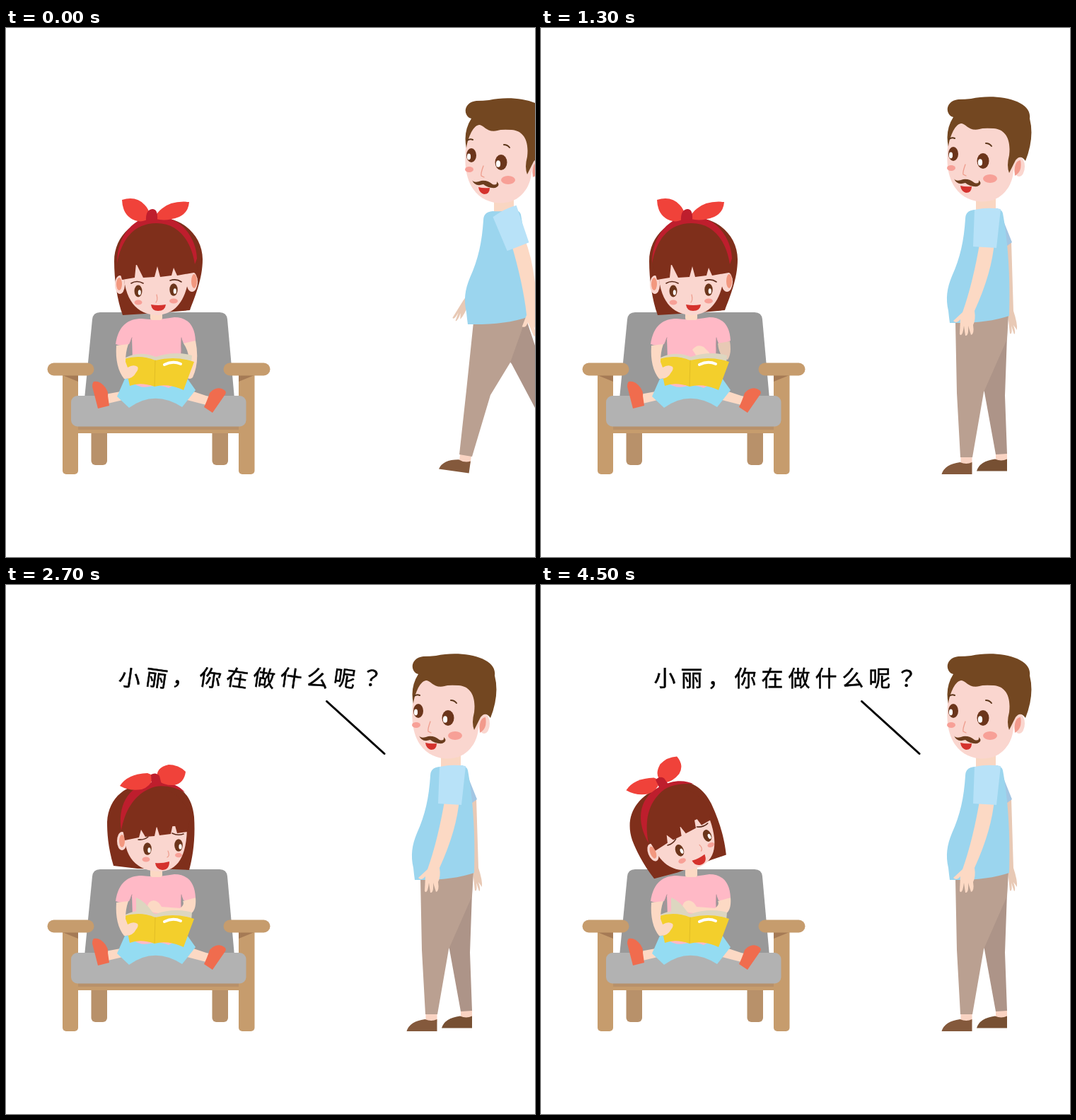
An HTML page that plays this animation: 748 by 748 pixels, repeating every 4700 ms.

```html
<!DOCTYPE html>
<html lang="zh">
<head>
<meta charset="utf-8">
<style>
  html, body { margin: 0; width: 100%; height: 100%; overflow: hidden; background: #fff; }
  svg { display: block; width: 100%; height: 100%; }
  text {
    font: 500 31px "Noto Sans CJK JP", "Noto Sans CJK SC", sans-serif;
    text-anchor: middle; stroke: #000; stroke-width: .5;
  }
</style>
</head>
<body>
<svg id="stage" viewBox="0 0 748 748"></svg>
<script>
const LOOP = 4700, FIRST = 500, STEP = 200;
const SKIN = '#fad6cf', LIMB = '#fcd9c4', SHADE = '#e8c9b5', WOOD = '#c69c6d',
  RED = '#f0423a', BAND = '#be1e2d', HAIR = '#7f2f1b', BROWN = '#734721',
  BLUSH = '#f7a097', PINK = '#ffb9c6', CREAM = '#ddd6c0', LIP = '#d5322d';

const shape = (d, fill) => `<path d="${d}" fill="${fill}"/>`;
const line = (d, color, w) =>
  `<path d="${d}" fill="none" stroke="${color}" stroke-width="${w}" stroke-linecap="round"/>`;
const oval = (x, y, rx, ry, fill) =>
  `<ellipse cx="${x}" cy="${y}" rx="${rx}" ry="${ry}" fill="${fill}"/>`;
const box = (x, y, w, h, r, fill) =>
  `<rect x="${x}" y="${y}" width="${w}" height="${h}" rx="${r}" fill="${fill}"/>`;
const turn = (a, x, y, body) => `<g transform="rotate(${a} ${x} ${y})">${body}</g>`;
const move = (x, y, body) => `<g transform="translate(${x} ${y})">${body}</g>`;
const eye = (x, y, rx, ry, dx) =>
  oval(x, y, rx, ry, '#6b351b') + oval(x + dx, y + 2, rx * .37, ry * .44, '#fff');

// Chair
const chair =
  box(120.5, 560, 22.5, 58, 6, '#b8916a') + box(291.5, 560, 22.5, 58, 6, '#b8916a') +
  shape('M111 524L122 412Q123 402 133 402H302Q312 402 313 412L323 524Z', '#999') +
  box(100, 563, 231, 10, 0, WOOD) + box(100, 563, 231, 5, 0, '#b8916a') +
  box(80, 482, 22, 149, 5, WOOD) + box(329, 482, 22.5, 149, 5, WOOD) +
  shape('M80 491H102V500Z', '#a57a55') + shape('M351 491H329V500Z', '#a57a55') +
  box(92, 520, 247.5, 43.5, 9, '#b2b2b2') +
  box(58.5, 473.5, 66, 18, 9, WOOD) + box(307.5, 473.5, 66, 18, 9, WOOD);

// Girl
const girlBase =
  shape('M162 514L140 518L144 531L165 526Z', LIMB) +
  shape('M262 513L289 522L283 533L256 526Z', LIMB) +
  shape('M124 500Q133 498 141 509Q145 515 144 520L146 534L130 538L122 507Q122 502 124 500Z', '#f06c4e') +
  shape('M288 516Q296 507 305 510Q313 513 310 518L292 544L280 536Q284 528 288 516Z', '#f06c4e') +
  shape('M168 496L157 521L174 537Q210 511 249 536L268 512L256 495Z', '#94dcf2');

const shirt =
  shape('M192 411C173 411 159 420 155 447Q164 451 174 447L178 438L180 502Q190 510 203 507Q217 503 230 509L246 500L248 438L251 446Q260 447 268 442C267 422 258 409 238 409Q212 414 192 411Z', PINK) +
  line('M178 438Q175 444 175 460M248 438Q247 450 249 460', '#b5909a', 1);

const book =
  shape('M169 466Q190 456 212 465Q238 456 263 463L262 474H169Z', CREAM) +
  shape('M167 468Q190 461 211 470Q240 463 266 472L251 512Q230 502 210 507Q190 500 175 506Z', '#f3cf2c') +
  line('M211 470L210 506', '#e2bd25', 1) +
  line('M224 476Q236 470 247 475', '#fff', 4);

const girlArms = {
  hold: shape('M251 446L268 442Q274 472 264 494Q260 498 255 494Q264 465 251 446Z', LIMB),
  rest: shape('M250 446L267 443Q270 460 264 469Q252 466 250 446Z', SHADE) +
    shape('M214 455Q221 446 230 451L238 459V467H222Z', LIMB),
  reach: shape('M250 447L268 442Q270 464 256 467Q235 468 216 464Q202 463 200 456Q200 447 209 446Q216 447 220 455L246 457Q253 452 250 447Z', LIMB)
};

const leftArm = shape('M156 449L173 447Q169 458 169 472L172 480Q180 475 186 479Q188 482 184 487Q179 497 167 496Q154 480 156 449Z', LIMB);
const neck = box(204, 398, 17, 15, 3, LIMB);

function frontHead(closed) {
  const eyes = closed
    ? line('M181 371Q187 369 194 371M183 374H191M231 370Q237 368 243 370M232 373H241', '#6b351b', 1)
    : eye(187, 372, 5.5, 8.5, 1.8) + eye(237, 370, 5.7, 8.8, 1.8);
  const mouth = closed
    ? shape('M210 393Q216 394 222 393Q220 399 216 398Q211 398 210 393Z', LIP)
    : shape('M205 391Q215 393 226 391Q225 400 215 400Q206 400 205 391Z', LIP);
  return shape('M153 330C153 292 184 268 216 268C252 268 278 296 278 327C278 355 267 380 260 399L228 402L165 406C157 385 153 355 153 330Z', HAIR) +
    neck +
    oval(161, 363, 7, 13, SKIN) + oval(160, 362, 4, 9, '#f2987f') +
    oval(263, 359, 8, 14, SKIN) + oval(266, 358, 4, 10, '#f2987f') +
    shape('M166 335C165 385 185 405 213 406C240 405 258 385 260 335Z', SKIN) +
    eyes + mouth +
    line('M177 361Q185 356 194 361M232 357Q241 354 248 359', '#5a2a1a', 1.6) +
    line('M213 377Q215 385 212 388', '#ee9c8c', 1.2) +
    oval(187, 388, 5.5, 3.5, BLUSH) + oval(237, 386, 6, 3.5, BLUSH) +
    shape('M157 330L164 356L182 353L184 333L194 353L210 352L214 337L218 352L234 350L237 339L242 350L271 345C272 300 245 274 213 274C180 274 158 300 157 330Z', HAIR) +
    shape('M157 333C157 292 182 266 212 266C248 266 269 297 270 326L267 334C262 300 243 276 213 276C180 276 163 300 157 333Z', BAND) +
    shape('M164 243Q184 237 196 250Q203 257 204 268Q195 275 186 273Q165 268 164 243Z', RED) +
    shape('M213 263Q228 243 259 246Q258 261 245 267Q227 274 212 270Z', RED) +
    shape('M198 273Q197 257 207 256Q215 256 214 271Q205 269 198 273Z', BAND);
}

// p runs from 0 (upright) to 1 (fully tilted)
function turnedHead(p) {
  const head =
    shape('M152 397C144 370 143 350 143 335C145 300 170 280 207 280C236 278 262 288 266 328C268 360 264 385 259 403L238 402L186 401Z', HAIR) +
    oval(164, 362, 7, 13, SKIN) + oval(164, 362, 4, 9, '#f2987f') +
    shape('M168 345C165 385 185 405 218 405C242 404 256 385 256 340Z', SKIN) +
    eye(200, 373, 5.8, 8.7, 2.5) + eye(244, 368, 5.8, 8.7, 2.5) +
    line('M187 360Q195 361 201 356M235 351Q243 355 251 352', '#5a2a1a', 1.6) +
    line('M229 376Q232 383 228 385', '#ee9c8c', 1.2) +
    oval(198, 388, 5.5, 3.5, BLUSH) + oval(244, 382, 5, 3.3, BLUSH) +
    shape('M211 393Q220 394 231 391Q231 403 221 403Q212 402 211 393Z', LIP) +
    shape('M164 340L168 361L188 357L191 346L197 356L210 355L213 341L217 354L233 352L237 333L242 351L256 349L262 325Q240 285 207 284Q170 290 164 340Z', HAIR) +
    shape('M163 347C158 315 170 284 206 279C228 276 244 283 253 293C236 284 215 281 203 288C180 298 168 320 163 347Z', BAND) +
    turn(22 * p, 207, 275, shape('M161 284Q172 267 200 266Q207 268 208 273Q204 285 192 289Q175 292 161 284Z', RED)) +
    turn(-26 * p, 215, 275, shape('M214 274Q211 258 230 254Q244 254 254 264Q252 280 238 283Q224 284 214 276Z', RED)) +
    shape('M205 268Q212 264 217 270L220 282Q210 283 206 282Z', BAND);
  return neck + move(5 * p, -4 * p, turn(-21.5 * p, 212, 400, head));
}

function girl(k) {
  const late = k >= 12, closed = [3, 4, 6, 10].includes(k);
  const arm = late ? 'reach' : [0, 1, 7, 8].includes(k) ? 'hold' : 'rest';
  const page = late ? 'M184 466V442Q196 446 209 465Z'
    : [3, 4, 10, 11].includes(k) ? 'M210 466Q205 450 212 441Q213 452 220 461Z' : '';
  const head = late ? turnedHead(Math.min(1, (k - 12) / 2)) : frontHead(closed);
  return girlBase + shirt + head + girlArms[arm] + shape(page, CREAM) + book + leftArm;
}

// Man
const manHead =
  shape('M577 150C573 180 572 205 585 225C600 247 625 248 640 243C660 235 668 215 668 200V140L590 130Z', SKIN) +
  oval(676, 196, 8, 14, SKIN) +
  shape('M580 125C571 119 573 103 590 101Q600 101 608 100C645 92 695 102 691 128Q698 155 685 188Q678 178 671 187L662 205Q658 195 662 180C665 155 655 143 640 142Q625 141 620 143C605 147 600 134 594 135C584 136 577 158 576 168Q571 145 583 126Z', BROWN) +
  shape('M670 209Q668 188 678 187Q681 203 670 209Z', '#f29a8c') +
  eye(583, 178, 7, 10, -3.5) + eye(625, 188, 8.5, 11, -4) +
  line('M577 157Q581 154 585 156M629 163Q634 163 637 167', '#5d371b', 2) +
  oval(580, 198, 6, 4, BLUSH) + oval(635, 213, 10, 6, BLUSH) +
  line('M600 193Q596 204 597 207L601 209', '#ee9c8c', 1.3) +
  shape('M593 223Q600 225 609 224Q609 233 601 233Q594 231 593 223Z', LIP) +
  shape('M584 213Q587 218 597 214Q606 213 613 219Q620 221 619 215Q625 221 617 224Q607 225 600 219Q588 223 584 213Z', '#6b3d1e');

const manBody =
  box(615, 240, 28, 22, 0, '#f9d6c2') +
  shape('M600 270Q600 258 613 257Q632 258 645 255Q652 257 653 262C660 300 664 350 662 407Q630 418 578 417Q577 410 576 400C572 382 574 368 581 351C593 325 598 300 600 270Z', '#9bd5ee');

const nearArm = ([s, e]) => turn(s, 632, 260,
  turn(e, 630, 308, shape('M621 300L641 302Q638 345 613 400Q615 412 611 420Q613 433 608 434L604 421Q605 436 600 435L598 421Q596 438 592 433L593 412Q587 419 583 414L596 402Q611 360 621 300Z', LIMB)) +
  shape('M613 257Q632 253 650 256L644 311L611 309Z', '#b8e2f8'));

const farArm = a => turn(a, 645, 265,
  shape('M655 300L665 302L668 400Q674 418 673 427L668 420Q672 432 669 433L665 421Q667 434 663 432L660 404Z', SHADE) +
  shape('M648 258L666 303L655 311Z', '#a3c6e3'));

const leg = (pts, foot, fill, shoe) => {
  const [x, y] = [0, 1].map(i => (pts[2][i] + pts[3][i]) / 2);
  return move(x, y, turn(foot, 0, 0,
      box(-8, -3, 16, 14, 0, '#f9d3c2') +
      shape('M-35 24Q-31 10 -9 7Q0 11 8 7V24Z', shoe))) +
    shape('M' + pts.join('L') + 'Z', fill);
};

// Each pose: leg outlines, foot angles, near arm angles, far arm angle
const stride = {
  near: [[586, 416], [576, 512], [566, 603], [584, 606], [610, 519], [638, 473], [661, 408]],
  far: [[600, 425], [640, 475], [700, 588], [715, 580], [690, 500], [660, 410]],
  feet: [8, -35], arm: [-25, -1], back: 38
};
const pass = {
  near: [[582, 416], [603, 515], [613, 607], [630, 607], [635, 505], [660, 440], [663, 405]],
  far: [[581, 416], [573, 502], [647, 582], [660, 572], [612, 500], [650, 410]],
  feet: [0, -30], arm: [10, 6], back: -6
};
const cross = {
  near: [[586, 416], [612, 512], [640, 604], [656, 601], [652, 510], [661, 450], [661, 408]],
  far: [[586, 416], [582, 512], [577, 605], [593, 606], [616, 515], [650, 410]],
  feet: [-10, 5], arm: [18, 8], back: -22
};
const stand = {
  near: [[586, 416], [588, 516], [593, 607], [610, 607], [626, 515], [659, 440], [661, 406]],
  far: [[610, 420], [627, 515], [643, 603], [659, 602], [656, 520], [660, 408]],
  feet: [0, 0], arm: [0, 0], back: 0
};
const mix = (a, b, p) => Array.isArray(a) ? a.map((v, i) => mix(v, b[i], p)) : a + (b - a) * p;
const blend = (a, b, p) =>
  Object.fromEntries(Object.keys(a).map(key => [key, mix(a[key], b[key], p)]));
const walk = [stride, blend(stride, pass, 1 / 3), blend(stride, pass, 2 / 3), pass, cross, stand];
const shift = [75, 59, 44, 28, 14, 0], bob = [2, 1, 0, 0, 0, 0];

function man(k) {
  const i = Math.min(k, 5), p = walk[i];
  return move(shift[i], 0,
    move(0, bob[i], farArm(p.back)) +
    leg(p.far, p.feet[1], '#ad9488', '#775033') +
    leg(p.near, p.feet[0], '#baa091', '#84593c') +
    move(0, bob[i], manBody + manHead + nearArm(p.arm)));
}

// Speech: every character rocks on a four-step beat
function speech(k) {
  if (k < 6) return '';
  const tilt = [0, 4, 8, 0][(k - 6) % 4];
  return [...'小丽，你在做什么呢？'].map((c, i) => {
    const x = 175 + 38 * i;
    return turn(tilt, x, 132, `<text x="${x}" y="143">${c}</text>`);
  }).join('') + line('M453.5 164.5L535 238.5', '#000', 3);
}

const stage = document.getElementById('stage');
const start = performance.now();
let shown = -1;
function draw() {
  const t = (performance.now() - start) % LOOP;
  const k = t < FIRST ? 0 : 1 + Math.floor((t - FIRST) / STEP);
  if (k !== shown) {
    shown = k;
    stage.innerHTML = chair + girl(k) + man(k) + speech(k);
  }
  requestAnimationFrame(draw);
}
draw();
</script>
</body>
</html>
```
